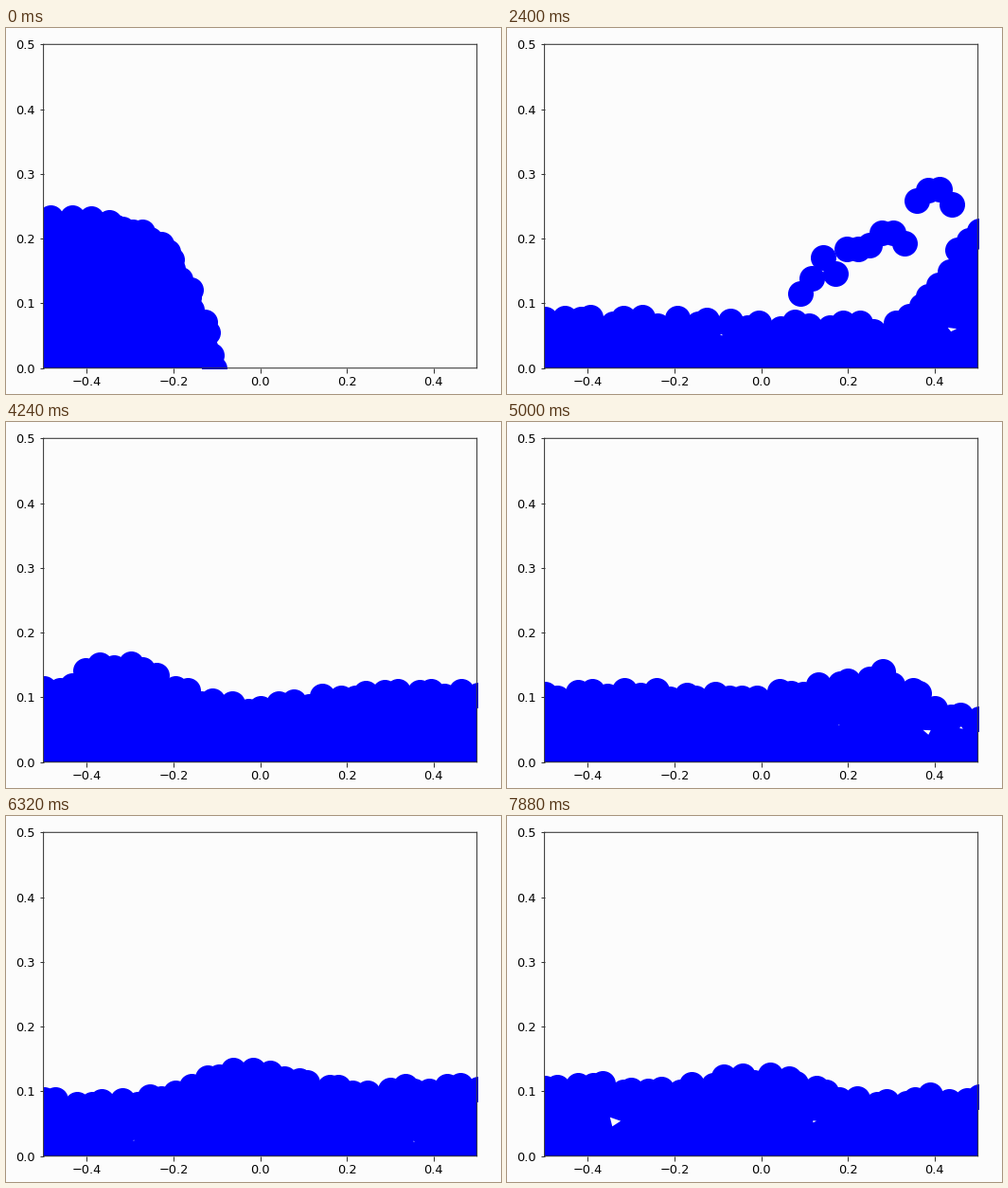
These frames come from a looping animation (523 by 386 pixels, 7920 ms). A matplotlib script:

```python
import numpy as np
import matplotlib.pyplot as plt
from matplotlib.animation import FuncAnimation
from matplotlib.collections import PolyCollection

W, H, DPI = 523, 386, 64
PX = 72 / DPI                        # points per pixel
LEFT, TOP, WIDE, TALL = 39.6, 17.3, 458, 341.4
BG, INK = "#fcfcfc", "0.2"
STEP, FRAMES = 40, 198
BEADS, DROPS, GAPS = 30, 14, 90
SPLASH = 2400                        # ms, spray off the right wall
GRAVITY = 0.005                      # px / ms^2

rng = np.random.default_rng(4)


def track(*points):
    """A value over time, linear between a few (ms, value) points."""
    t, v = zip(*points)
    return lambda now: np.interp(now, t, v)


# Column: depth = level * (1 - (x / reach) ** bulge)
level = track((0, 156), (1040, 153), (1320, 150), (1600, 138), (2400, 52), (3400, 72))
reach = track((0, 180), (1040, 188), (1320, 264), (1600, 470), (2400, 2000), (2800, 2e4))
bulge = track((1040, 4.4), (1320, 2.4), (1600, 1.2), (2400, 1))

# Wave: a crest with a trough ahead; each whole number is one wall
crest = track((2350, -1), (2800, -0.72), (3400, -0.14), (4000, 0), (5000, 0.78),
              (5640, 1), (6320, 1.55), (7200, 2), (7880, 2.5))
height = track((1560, 0), (2320, 65), (2800, 28), (3400, 16), (4000, 36),
               (5640, 25), (6320, 20), (7200, 24), (7880, 13))
width = track((2400, 0.09), (3400, 0.12))
trough = track((2400, 0), (3400, 14))

period = rng.uniform(700, 1700, (BEADS, 2))
phase = rng.uniform(0, 2 * np.pi, (BEADS, 2))

along = np.linspace(0, 1, DROPS)
spray = np.column_stack([50 + 95 * along, 0 * along])
spray = np.column_stack([270 + 160 * along, 85 + 95 * along + rng.uniform(-24, 24, DROPS)])

gap_time = rng.uniform(SPLASH - 100, FRAMES * STEP, GAPS)
gap_spot = np.column_stack([rng.uniform(10, 450, GAPS), rng.uniform(12, 45, GAPS)])
gap_size = rng.exponential(2.2, GAPS) + 0.8
gap_turn = rng.uniform(0, 2 * np.pi, (GAPS, 1)) + np.array([0, 1.8, 3.6])


def depth(x, t):
    d = level(t) * (1 - np.clip(x / reach(t), 0, 1) ** bulge(t))
    for u in (x / WIDE, -x / WIDE):  # the wave and its reflection
        z = (u - crest(t) + 1) % 2 - 1
        d += height(t) * np.exp(-(z / width(t)) ** 2)
        d -= trough(t) * np.exp(-((z - 0.27) / 0.2) ** 2)
    return d


def surface(t):
    """Beads evenly spaced along the water line, each swaying a little."""
    x = np.linspace(0, min(reach(t), WIDE + 1), 400)
    y = depth(x, t)
    run = np.r_[0, np.cumsum(np.hypot(np.diff(x), np.diff(y)))]
    s = np.linspace(0, run[-1], BEADS)
    line = np.column_stack([np.interp(s, run, x), np.interp(s, run, y)])
    sway = np.sin(2 * np.pi * t / period + phase) * [4, 4.5]
    sway[[0, -1]] = 0
    return line + sway


def flying(t):
    dt = t - SPLASH
    return spray + [-0.2 * dt, -0.15 * dt - GRAVITY * dt ** 2 / 2]


def to_data(p):
    return p / [WIDE, TALL * 2] - [0.5, 0]


fig = plt.figure(figsize=(W / DPI, H / DPI), dpi=DPI, facecolor=BG)
ax = fig.add_axes([LEFT / W, 1 - (TOP + TALL) / H, WIDE / W, TALL / H], facecolor=BG)
ax.set(xlim=(-0.5, 0.5), ylim=(0, 0.5), xticks=[-0.4, -0.2, 0, 0.2, 0.4],
       yticks=np.arange(6) / 10)
ax.tick_params(labelsize=12.83 * PX, length=4.5 * PX, width=1.03 * PX,
               pad=4.5 * PX, color=INK)
ax.tick_params(axis="x", pad=3.8 * PX)
for spine in ax.spines.values():
    spine.set(linewidth=1.03 * PX, edgecolor=INK, snap=False)

body = PolyCollection([], facecolor="blue", edgecolor="none", zorder=2)
gaps = PolyCollection([], facecolor=BG, edgecolor="none", zorder=2.2)
ax.add_collection(body, autolim=False)
ax.add_collection(gaps, autolim=False)
balls, = ax.plot([], [], "o", color="blue", ms=25.7 * PX, mew=1.28 * PX, zorder=2.1)


def draw(n):
    t = n * STEP
    top = surface(t)
    floor = [[top[-1, 0], -8], [-10, -8], [-10, top[0, 1]]]
    body.set_verts([to_data(np.vstack([top, floor]))])
    balls.set_data(*to_data(np.vstack([top, flying(t)])).T)
    shown = np.abs(t - gap_time) < 1.5 * STEP
    corners = np.stack([np.cos(gap_turn), 0.6 * np.sin(gap_turn)], axis=2)
    tri = gap_spot[:, None] + gap_size[:, None, None] * corners
    gaps.set_verts([to_data(p) for p in tri[shown]])
    return body, balls, gaps


anim = FuncAnimation(fig, draw, frames=FRAMES, interval=STEP, repeat=True,
                     repeat_delay=0, blit=False)
plt.show()
```
